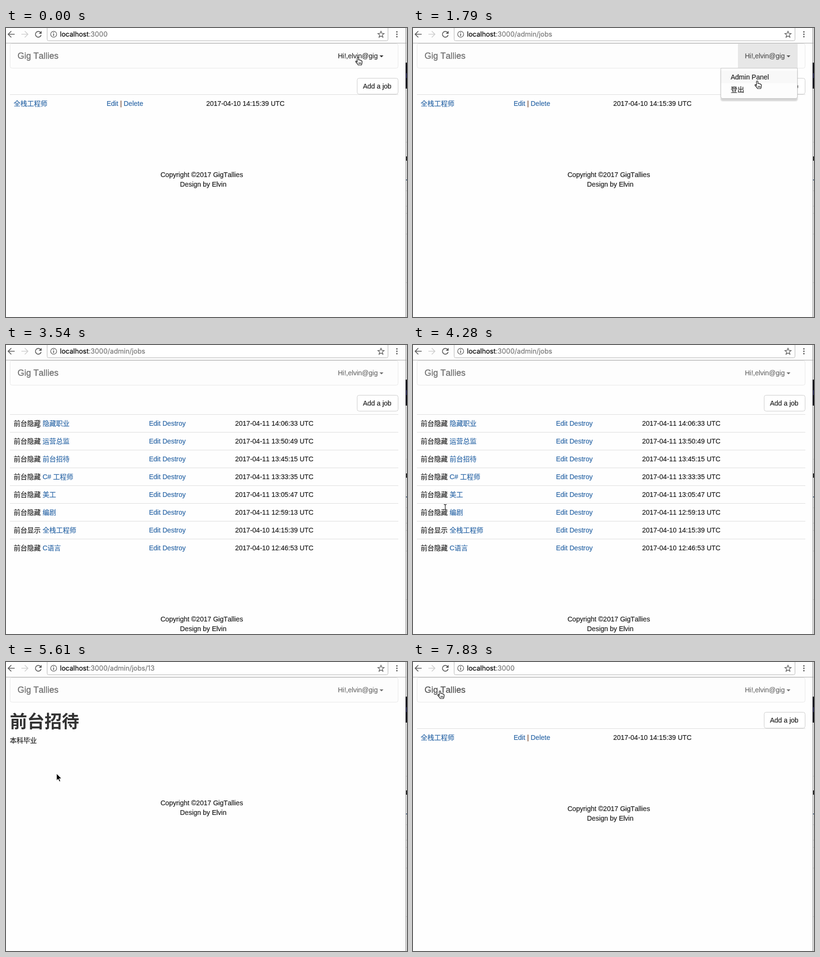
These frames come from a looping animation (833x601 px, 8000 ms). An HTML page:

```html
<!DOCTYPE html>
<html lang="zh-CN">
<head>
<meta charset="utf-8">
<title>Jobs</title>
<style>
  html, body { margin: 0; width: 100%; height: 100%; overflow: hidden; background: #fefefe; }
  svg { display: block; width: 833px; height: 601px; }
  text {
    font: 14px "Liberation Sans", "Noto Sans CJK SC", "Noto Sans CJK", sans-serif;
    font-kerning: none; white-space: pre;
    color: #1c1c1c; fill: currentColor; stroke: currentColor; stroke-width: .2px;
  }
  text.url { font: 14px Inter, sans-serif; color: #757575; }
  .url .host { color: #000; fill: currentColor; stroke: currentColor; }
  text.brand { font-size: 18px; stroke-width: .35px; }
  text.heading { font-size: 36px; font-weight: 700; color: #333; stroke: none; }
  text.link { color: #2a66a6; }
  text.hovered { color: #23527c; text-decoration: underline; }
  .icon { fill: none; stroke: #5a5a5a; stroke-width: 1.7; }
  .icon.pale { stroke: #cfcfcf; }
  .icon.thin { stroke-width: 1.3; }
  .menu { filter: drop-shadow(0 5px 1px rgba(0, 0, 0, .16)); }
</style>
</head>
<body>
<svg viewBox="0 0 833 601">
  <rect width="833" height="601" fill="#fefefe"/>
  <g id="view"></g>

  <rect width="833" height="31" fill="#fdfdfd"/>
  <path d="M0 31.5H830" stroke="#a9a9a9"/>
  <rect x="85.5" y="-4.5" width="708" height="31" rx="3" fill="#fff" stroke="#b4b4b4"/>
  <path class="icon" d="M18 13H5M11 6.5L4.5 13L11 19.5"/>
  <path class="icon pale" d="M32 13H45M39 6.5L45.5 13L39 19.5"/>
  <path class="icon" d="M72 9.5A6 6 0 1 0 73 14.5"/>
  <path d="M74 6V12H68Z" fill="#5a5a5a"/>
  <circle class="icon thin" cx="99" cy="13" r="6.2"/>
  <path class="icon" d="M99 12V16.5M99 9V10.6"/>
  <path class="icon thin" d="M779 6.8L780.8 11.2L785.5 11.5L781.9 14.5L783.1 19.2L779 16.6L774.9 19.2L776.1 14.5L772.5 11.5L777.2 11.2Z"/>
  <g fill="#5a5a5a"><circle cx="812" cy="8" r="1.6"/><circle cx="812" cy="13" r="1.6"/><circle cx="812" cy="18" r="1.6"/></g>
  <text class="url" x="112" y="18"><tspan class="host">localhost</tspan>:3000<tspan id="path"></tspan></text>

  <rect x="830" width="3" height="601" fill="#e3e3e3"/>
  <path d="M830.5 0V601" stroke="#8e8e8e"/>
  <path d="M831 31.5h2m-2 206h2m-2 101h2m-2 32h2m-2 15h2m-2 43h2m-2 101h2" stroke="#c2c2c2"/>
  <path d="M830 72h3v54h-3z" fill="#15151c"/>
  <path d="M831 94h2v10h-2z" fill="#30305c"/>
  <path d="M831 267h2v9h-2z" fill="#222"/>
  <path d="M831 316h2" stroke="#4a6484" stroke-width="2"/>
  <g id="cursor"></g>
</svg>

<script>
const LOOP = 8000;
const byId = id => document.getElementById(id);

const text = (x, y, content, cls = "", color = "") =>
  `<text x="${x}" y="${y}" class="${cls}"${color && ` style="color:${color}"`}>${content}</text>`;
const rule = y => `<path d="M8 ${y}H815" stroke="#ddd"/>`;

const BEAM = "M-3-7.5Q0-7.5 0-6Q0-7.5 3-7.5M0-6V6M-3 7.5Q0 7.5 0 6Q0 7.5 3 7.5M-2 3H2";
const CURSORS = {
  arrow: `<path d="M0 0V14.5L3.4 11.4L5.8 17L8.2 16L5.8 10.5H10.5Z" fill="#000" stroke="#fff"/>`,
  hand: `<path d="M-1.5 9.5V1.5Q-1.5 0 0 0Q1.5 0 1.5 1.5V6Q1.8 5 3 5Q4.3 5 4.4 6.5
    Q4.8 5.6 5.9 5.8Q7 6 7 7.3Q8.7 6.9 8.7 9V11Q8.5 13.5 7.3 16H.5
    Q-.5 13.5-4.3 9.8Q-5.2 8.5-4.2 7.7Q-3 7.2-1.5 9.5Z" fill="#fff" stroke="#111" stroke-width="1.2"/>
    <path d="M2 10.5V14M4 10.5V14M6 10.5V14" stroke="#111"/>`,
  ibeam: `<g fill="none"><path d="${BEAM}" stroke="#fff" stroke-width="2.6"/>
    <path d="${BEAM}" stroke="#111" stroke-width="1.2"/></g>`
};

const JOBS = [
  ["隐藏职业", "11 14:06:33"],
  ["运营总监", "11 13:50:49"],
  ["前台招待", "11 13:45:15"],
  ["C# 工程师", "11 13:33:35"],
  ["美工", "11 13:05:47"],
  ["编剧", "11 12:59:13"],
  ["全栈工程师", "10 14:15:39"],
  ["C语言", "10 12:46:53"]
];

const footer = y =>
  text(321, y, "Copyright ©2017 GigTallies") + text(361.5, y + 20, "Design by Elvin");

const addButton = `<rect x="729.5" y="104.5" width="85" height="33" rx="4" fill="#fff" stroke="#ccc"/>`
  + text(741.5, 126, "Add a job");

const PAGES = {
  list: () => addButton + rule(138.5)
    + text(16, 162, "全栈工程师", "link") + text(209, 162, "Edit", "link")
    + text(237, 162, "|", "", "#6b3a1e") + text(244.5, 162, "Delete", "link")
    + text(416, 162, "2017-04-10 14:15:39 UTC") + footer(310),

  admin: hover => addButton + JOBS.map(([name, date], i) => {
    const y = 168 + 37 * i;
    return rule(y - 23.5)
      + text(16, y, name === "全栈工程师" ? "前台显示" : "前台隐藏")
      + text(76, y, name, hover === "job" && i === 2 ? "link hovered" : "link")
      + text(297, y, "Edit Destroy", "link")
      + text(476, y, `2017-04-${date} UTC`);
  }).join("") + footer(575),

  detail: () => text(8, 137, "前台招待", "heading") + text(8, 168, "本科毕业") + footer(298)
};

function navbar(hover) {
  const open = hover === "menu";
  const userColor = open ? "#505050" : hover === "user" ? "#2b2b2b" : "#6c6c6c";
  return `<rect x="8.5" y="32.5" width="806" height="51" rx="4" fill="#fdfdfd" stroke="#e7e7e7"/>`
    + (open ? `<path d="M675 33H799V83H675Z" fill="#e7e7e7"/>` : "")
    + text(24, 64, "Gig Tallies", "brand", hover === "brand" ? "#555" : "#707070")
    + text(689.5, 63, "Hi!,elvin@gig", "", userColor)
    + `<path d="M776 57H784L780 61Z" fill="${userColor}"/>`;
}

const menu = `<path class="menu" d="M639.5 83.5H798.5V143Q798.5 146.5 795 146.5H643Q639.5 146.5 639.5 143Z"
  fill="#fdfdfd" stroke="#c4c4c4"/><path d="M640 89H798V115H640Z" fill="#f8f8f8"/>`
  + text(660, 107, "Admin Panel") + text(660, 133, "登出");

// [start ms, page, url path, hovered part]
const SCENES = [
  [0, "list", "", "user"],
  [600, "list", "", "menu"],
  [1340, "list", "/admin/jobs", "menu"],
  [1930, "admin", "/admin/jobs", ""],
  [4860, "admin", "/admin/jobs", "job"],
  [5610, "detail", "/admin/jobs/13", ""],
  [6650, "detail", "/admin/jobs/13", "user"],
  [7100, "detail", "/admin/jobs/13", ""],
  [7540, "detail", "/admin/jobs/13", "brand"],
  [7830, "list", "", "brand"]
];

// [start ms, shape, x, y]
const POINTER = [
  [0, "hand", 731, 61], [750, "hand", 728, 76], [900, "hand", 720, 98], [1050, "hand", 715, 110],
  [1930, "arrow", 700, 125], [2080, "arrow", 620, 185], [2220, "arrow", 530, 228], [2370, "arrow", 461, 237],
  [2520, "arrow", 248.5, 170], [2660, "arrow", 150, 165], [2810, "ibeam", 66, 161], [2950, "ibeam", 38, 161],
  [3100, "ibeam", 25, 163], [3240, "ibeam", 36, 164], [3390, "ibeam", 56, 164], [3540, "ibeam", 67, 164],
  [3690, "ibeam", 66, 190], [3840, "ibeam", 66, 237], [3980, "ibeam", 67, 292], [4130, "ibeam", 67, 334],
  [4280, "ibeam", 67, 339], [4430, "ibeam", 68, 315], [4570, "ibeam", 72, 281], [4720, "arrow", 96, 250],
  [4860, "hand", 104, 238], [5010, "hand", 105, 232], [5610, "arrow", 105, 232],
  [5910, "arrow", 92, 245], [6060, "arrow", 82, 251], [6210, "arrow", 200, 220], [6350, "arrow", 430, 140],
  [6500, "arrow", 600, 80], [6650, "hand", 725, 55], [6950, "arrow", 640, 38],
  [7100, "arrow", 257, 66], [7390, "arrow", 130, 63], [7540, "hand", 56, 60]
];

const stepAt = (table, t) => table.findLast(([start]) => start <= t);

let shownScene, shownPointer;

function draw(t) {
  const scene = stepAt(SCENES, t);
  const pointer = stepAt(POINTER, t);
  if (scene !== shownScene) {
    const [, page, path, hover] = shownScene = scene;
    byId("view").innerHTML = navbar(hover) + PAGES[page](hover) + (hover === "menu" ? menu : "");
    byId("path").textContent = path;
  }
  if (pointer !== shownPointer) {
    const [, shape, x, y] = shownPointer = pointer;
    byId("cursor").innerHTML = CURSORS[shape];
    byId("cursor").setAttribute("transform", `translate(${x} ${y})`);
  }
}

const begin = performance.now();
function tick() {
  draw((performance.now() - begin) % LOOP);
  requestAnimationFrame(tick);
}
tick();
</script>
</body>
</html>
```
